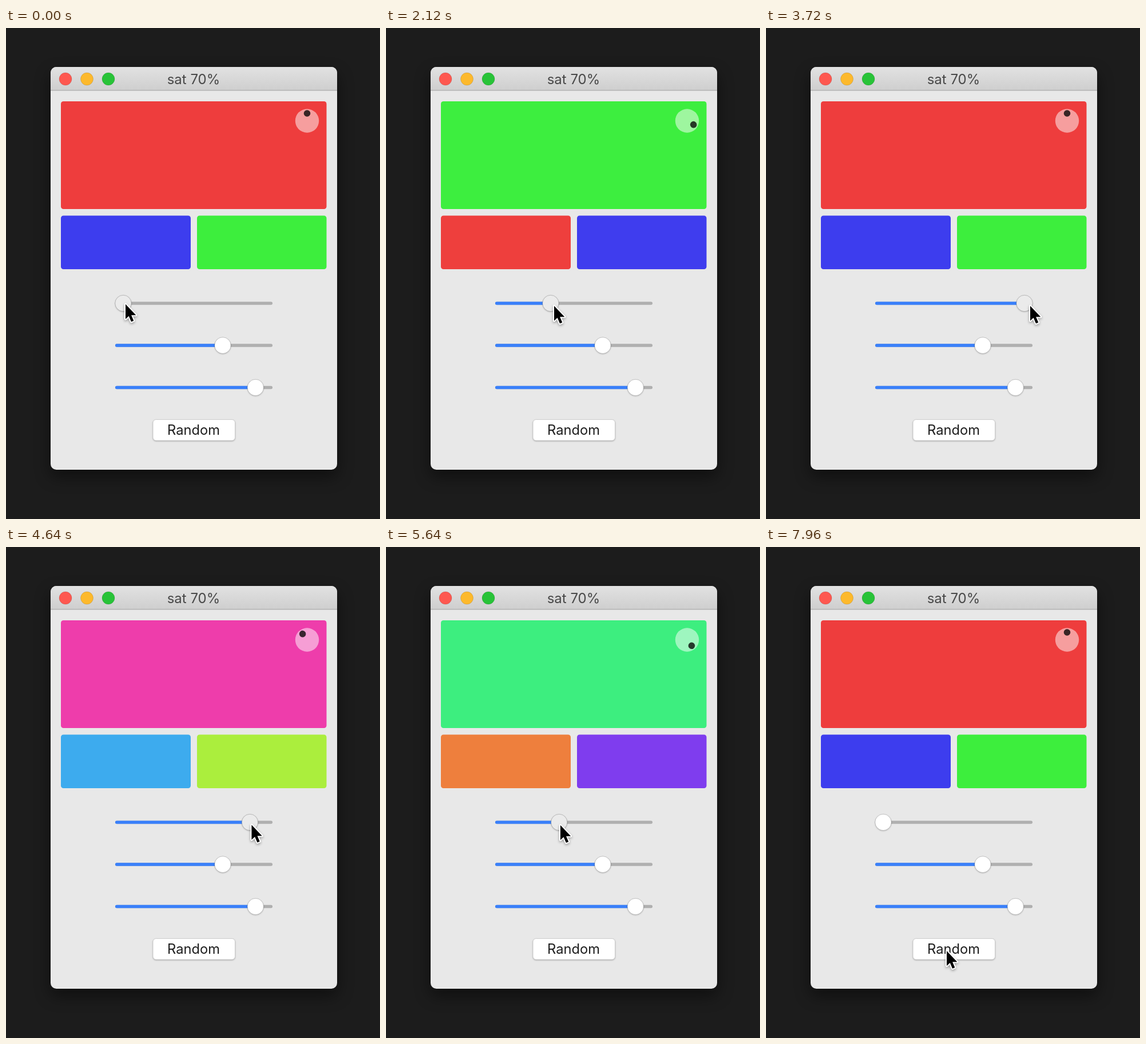
Write an HTML page that moves like this. It is 654 px wide and 857 px high and loops after 8 s.

```html
<!DOCTYPE html>
<html lang="en">
<head>
<meta charset="utf-8">
<title>Colour picker</title>
<style>
  html, body { margin: 0; width: 100%; height: 100%; overflow: hidden; background: #1c1c1c; }
  svg { display: block; width: 654px; height: 857px; }
  text { font-family: Inter, "Noto Sans", sans-serif; text-anchor: middle; }
  .fill, .rail { stroke-width: 5.5; stroke-linecap: round; }
  .rail { stroke: #b0b0b0; }
  .fill { stroke: #3a80fa; }
  .knob { fill: #fff; stroke: #000; stroke-opacity: .2; stroke-width: 1; filter: drop-shadow(0 1px 1px #0003); }
  #window { filter: drop-shadow(0 12px 14px #0007); }
  #button { filter: drop-shadow(0 1px 1px #0004); }
  #cursor { filter: drop-shadow(0 2px 2px #0005); }
</style>
</head>
<body>
<svg viewBox="0 0 654 857">
  <defs>
    <linearGradient id="bar" x2="0" y2="1">
      <stop stop-color="#e2e2e2"/>
      <stop offset="1" stop-color="#cecece"/>
    </linearGradient>
  </defs>

  <rect id="window" x="78" y="68" width="501" height="703" rx="10" fill="#e8e8e8"/>
  <path d="M78 109V78a10 10 0 0 1 10-10H569a10 10 0 0 1 10 10V109Z" fill="url(#bar)"/>
  <path d="M78 108.8H579" stroke="#b2b2b2" stroke-width="1.5"/>
  <g stroke="#000" stroke-opacity=".12">
    <circle cx="104" cy="89" r="11" fill="#fe5850"/>
    <circle cx="141.5" cy="89" r="11" fill="#fdb92c"/>
    <circle cx="179" cy="89" r="11" fill="#28c338"/>
  </g>
  <text x="328" y="98" font-size="24" fill="#484848">sat 70%</text>

  <rect class="tile" x="96" y="128" width="464.5" height="188" rx="4.5"/>
  <rect class="tile" x="96" y="327.5" width="227" height="93.5" rx="4.5"/>
  <rect class="tile" x="334" y="327.5" width="226.5" height="93.5" rx="4.5"/>
  <circle cx="526.5" cy="162" r="20.7" fill="#fff" fill-opacity=".5"/>
  <circle id="dot" cx="526.5" cy="149" r="5.8" fill="#000" fill-opacity=".77"/>

  <g id="sliders"></g>

  <rect id="button" x="257" y="683.5" width="143.5" height="36.5" rx="5.5" fill="#fff" stroke="#c9c9c9" stroke-width=".8"/>
  <text x="328" y="710" font-size="23.7" fill="#1d1d1d">Random</text>

  <path id="cursor" d="M0 0V26L5.7 20.8 10 30.8 14.3 29 10.1 19.2H18.3Z"
        stroke="#fff" stroke-width="4" stroke-linejoin="round" paint-order="stroke"/>
</svg>
<script>
const DURATION = 8000, STEP = 40;
const KNOB_MIN = 205, KNOB_MAX = 452;
const RELEASE = 6700, KNOB_LAG = 15, GRIP = 4.5;

// Pointer path: time, x, y
const path = [
  [0, 209, 482], [1100, 209, 482], [2120, 294, 485], [2840, 401, 485],
  [3450, 462, 485], [4100, 462, 485], [5160, 371, 485], [6120, 240, 486],
  [6560, 205, 486], [6750, 203, 487], [6910, 165, 505], [7070, 140, 580],
  [7190, 156, 645], [7310, 188, 690], [7450, 238, 707], [7750, 316, 705],
  [8000, 316, 705]
];

const slope = (i, axis) => path[i + 1]
  ? (path[i + 1][axis] - path[i][axis]) / (path[i + 1][0] - path[i][0]) : 0;

// Harmonic mean of neighbouring slopes keeps the curve free of overshoot
function tangent(i, axis) {
  if (i === 0) return 0;
  const a = slope(i - 1, axis), b = slope(i, axis);
  return a * b > 0 ? 2 * a * b / (a + b) : 0;
}

function pointer(time, axis) {
  const t = Math.max(0, time);
  const i = path.findIndex((p, k) => t < path[k + 1][0]);
  const p = path[i], q = path[i + 1], span = q[0] - p[0];
  const u = (t - p[0]) / span, v = 1 - u;
  return v * v * (1 + 2 * u) * p[axis] + u * u * (3 - 2 * u) * q[axis]
    + span * u * v * (v * tangent(i, axis) - u * tangent(i + 1, axis));
}

const sliders = document.getElementById('sliders');
function addSlider(y) {
  const group = document.createElementNS('http://www.w3.org/2000/svg', 'g');
  group.innerHTML = `<path class="rail" d="M193.7 ${y}H463.3"/><path class="fill"/>
    <circle class="knob" cy="${y}" r="14.2"/>`;
  sliders.append(group);
  const [, fill, knob] = group.children;
  return (x, pressed) => {
    fill.setAttribute('d', `M193.7 ${y}H${x}`);
    knob.setAttribute('cx', x);
    knob.style.fill = pressed ? '#ebebeb' : '#fff';
  };
}

const setHue = addSlider(480.5);
addSlider(554)(379);
addSlider(627.5)(436.3);

const tiles = document.querySelectorAll('.tile');
const dot = document.getElementById('dot');
const cursor = document.getElementById('cursor');

function draw(time) {
  const grip = pointer(Math.min(time, RELEASE) - KNOB_LAG, 1) - GRIP;
  const x = Math.min(KNOB_MAX, Math.max(KNOB_MIN, grip));
  const hue = 360 * (x - KNOB_MIN) / (KNOB_MAX - KNOB_MIN);
  setHue(x, time < RELEASE);
  [0, -120, 120].forEach((turn, i) => {
    tiles[i].style.fill = `hsl(${(hue + turn + 360) % 360}, 84%, 58.6%)`;
  });
  dot.setAttribute('transform', `rotate(${hue} 526.5 162)`);
  cursor.setAttribute('transform', `translate(${pointer(time, 1)} ${pointer(time, 2)})`);
}

function frame() {
  const time = performance.now() % DURATION;
  draw(Math.floor(time / STEP) * STEP);
  requestAnimationFrame(frame);
}
frame();
</script>
</body>
</html>
```
